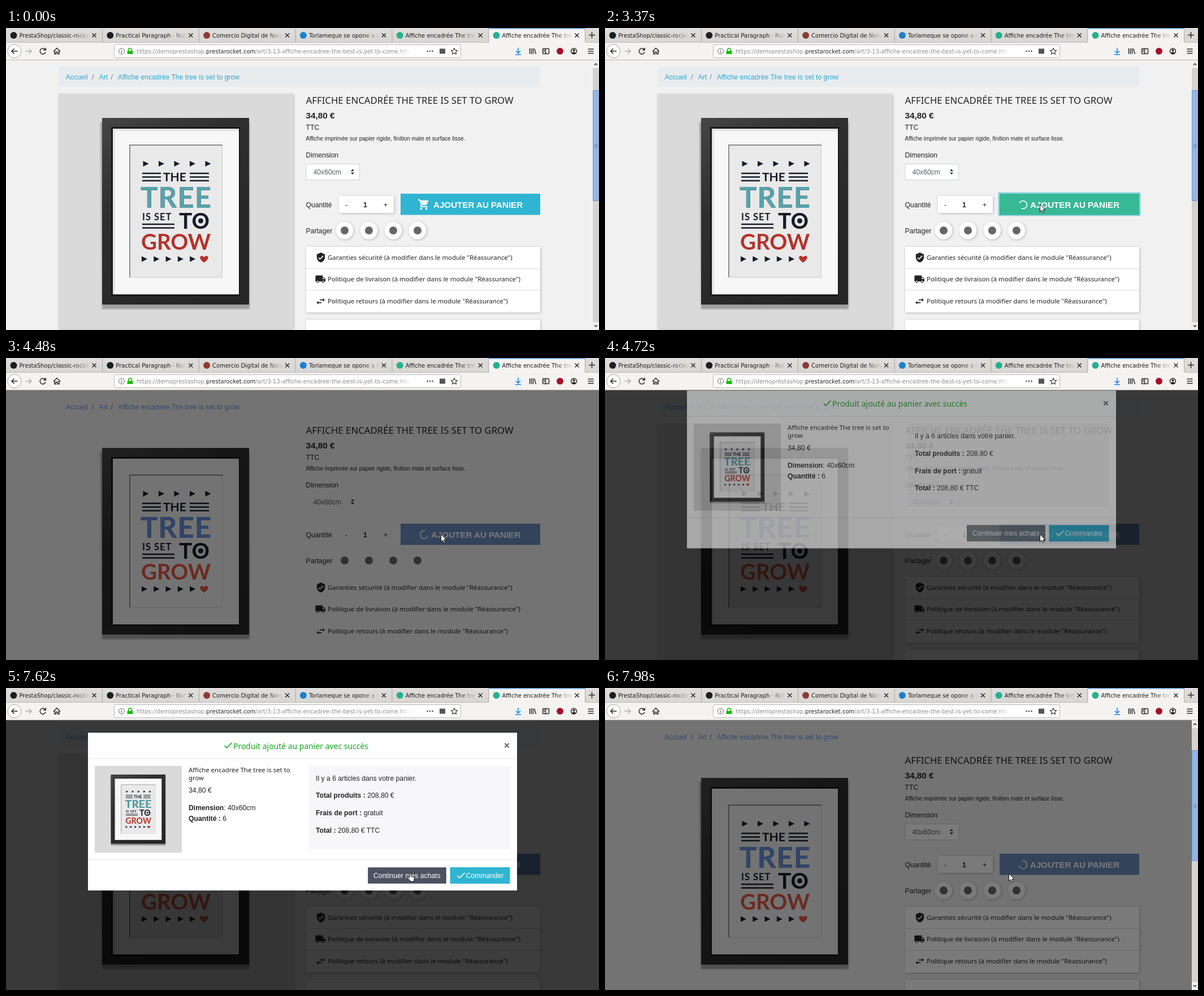
An HTML page that plays this animation: 1049 by 534 pixels, repeating every 8000 ms.

```html
<!DOCTYPE html>
<html lang="fr">
<head>
<meta charset="utf-8">
<title>Panier</title>
<style>
html, body { margin: 0; width: 100%; height: 100%; overflow: hidden; }
svg { display: block; width: 1049px; height: 534px; font: 12.2px "Liberation Sans", Arial, sans-serif; fill: #232323; }
text { white-space: pre; }
.noto { font-family: "Noto Sans", sans-serif; }
.ui { font: 10px "DejaVu Sans", sans-serif; }
.art { font-family: Lato, sans-serif; font-weight: 700; }
.b { font-weight: bold; }
.w { fill: #fff; }
.line { fill: none; stroke: #2b2b2b; stroke-width: 1.5; }
.card { fill: #fff; filter: drop-shadow(1px 1px 2px rgba(0,0,0,.25)); }
.rule { stroke: #dcdcdc; }
#page { --link: #2fa8d2; --teal: #58a2ab; --red: #b5322b; }
#page.dim { --link: #6598e6; --teal: #6890dc; --red: #dc5843; }
#page.plain { --wall: #f1f1f1; --mat: #f1f1f1; --edge: #f1f1f1; --paper: #f1f1f1; }
#page.plain .base { visibility: hidden; }
#page.flat .card, #page.flat .soft { fill: none; stroke: none; filter: none; }
.link { fill: var(--link); }
.teal { fill: var(--teal, #58a2ab); }
.red { fill: var(--red, #b5322b); }
.wall { fill: var(--wall, #dadada); }
.mat { fill: var(--mat, #f7f7f7); }
.edge { fill: var(--edge, #e4e4e4); }
.paper { fill: var(--paper, #e9e9e9); }
</style>
</head>
<body>
<svg viewBox="0 0 1049 534">
<defs>
  <linearGradient id="tabFade" gradientUnits="userSpaceOnUse" x1="118" x2="149">
    <stop stop-color="#1c1c1c"/><stop offset="1" stop-color="#1c1c1c" stop-opacity="0"/>
  </linearGradient>
  <linearGradient id="urlFade" gradientUnits="userSpaceOnUse" x1="692" x2="716">
    <stop stop-color="#8c8c8c"/><stop offset="1" stop-color="#8c8c8c" stop-opacity="0"/>
  </linearGradient>
  <linearGradient id="wood" x2=".6" y2="1">
    <stop stop-color="#454545"/><stop offset=".4" stop-color="#2f2f2f"/><stop offset="1" stop-color="#262626"/>
  </linearGradient>
  <linearGradient id="bar" x2="0" y2="1">
    <stop stop-color="#dfdddb"/><stop offset="1" stop-color="#d8d6d3"/>
  </linearGradient>
  <path id="check" d="M9 16.17 4.83 12l-1.42 1.41L9 19 21 7l-1.41-1.41z"/>
  <symbol id="poster" viewBox="93 117 415 415">
    <path class="wall" d="M93 117H508V532H93Z"/>
    <path d="M167 166H431V497H170Z" fill="#777" opacity=".6" style="filter:blur(1.5px)"/>
    <path d="M170 159H430V489H170Z" fill="url(#wood)"/>
    <path d="M186 175H414V474H186Z" fill="#191919"/>
    <path class="mat" d="M189 178H412V471H189Z"/>
    <path class="edge" d="M189 178H412V182H193V471H189Z"/>
    <path class="paper" d="M218 206H383V441H218Z"/>
    <path d="M219 441V207H383" fill="none" stroke="#8d8d8d" stroke-width="2"/>
    <path d="M382.500 208V441H219" fill="none" stroke="#c9c9c9"/>
    <g id="marks" fill="#171c28"></g>
    <g class="art" fill="#171c28">
      <path d="M241 257H274M241 263.500H274M241 270H274M325 257H359M325 263.500H359M325 270H359M241 347H298M241 353.500H298" stroke="#171c28" stroke-width="2.300"/>
      <text x="278" y="271" font-size="21">THE</text>
      <text x="238" y="317.500" font-size="51" letter-spacing="1">TREE</text>
      <text x="238" y="317.500" font-size="51" letter-spacing="1" class="teal">TREE</text>
      <text x="241" y="340" font-size="16.500" letter-spacing="1">IS SET</text>
      <text x="306" y="355" font-size="39">TO</text>
      <circle cx="344.500" cy="341" r="4.500"/>
      <text x="239" y="392" font-size="38.500" class="red">GROW</text>
      <path class="red" d="M350.500 415C340 407 343 403 346.500 403Q349.500 403 350.500 405.500 351.500 403 354.500 403C358 403 361 407 350.500 415Z"/>
    </g>
  </symbol>
</defs>

<g id="page">
  <path d="M0 56H1049V534H0Z" fill="#f1f1f1"/>
  <path class="base" d="M93 68H945V104H93Z" fill="#e8ecef"/>
  <g class="link">
    <text x="105.500" y="90.500">Accueil</text>
    <text x="164.500" y="90.500">Art</text>
    <text x="198" y="90.500">Affiche encadrée The tree is set to grow</text>
  </g>
  <text x="152" y="90.500" fill="#777">/</text><text x="185.500" y="90.500" fill="#777">/</text>
  <path class="card base" d="M93 117H508V532H93Z"/>
  <use href="#poster" x="93" y="117" width="415" height="415"/>

  <text class="noto" x="530.500" y="134" font-size="16.800">AFFICHE ENCADRÉE THE TREE IS SET TO GROW</text>
  <text class="b" x="530.500" y="160" font-size="15.300">34,80 €</text>
  <text x="530.500" y="179.500">TTC</text>
  <text x="530.500" y="198.500" font-size="10.050">Affiche imprimée sur papier rigide, finition mate et surface lisse.</text>
  <text x="530.500" y="229">Dimension</text>
  <path class="soft" d="M531 240.500H625.500V268.500H531Z" fill="#fff" stroke="#ccd0d4"/>
  <text x="543.500" y="258.500" fill="#55595c">40x60cm</text>
  <path d="M610 253 613 249.500 616 253ZM610 255.500 613 259 616 255.500Z"/>
  <text x="530.500" y="316.500">Quantité</text>
  <path class="card" d="M589 297H686V327H589Z"/>
  <text x="600" y="316.500">-</text><text class="b" x="632" y="316.500">1</text><text x="668" y="316.500">+</text>

  <path id="ring" d="M697 292H946V331H697Z" fill="none" stroke="#8fd0df" stroke-width="3"/>
  <path id="add" d="M698 293H945V330.500H698Z"/>
  <path id="cart" class="w" transform="translate(728 301)scale(.92)" d="M7 18c-1.100 0-1.990.9-1.990 2S5.900 22 7 22s2-.9 2-2-.9-2-2-2zM1 2v2h2l3.600 7.590-1.350 2.450c-.16.28-.25.61-.25.96 0 1.100.9 2 2 2h12v-2H7.420c-.14 0-.25-.11-.25-.25l.03-.12.9-1.630h7.450c.75 0 1.410-.41 1.750-1.030l3.580-6.490A1 1 0 0 0 20 4H5.210l-.94-2H1zm16 16c-1.100 0-1.990.9-1.990 2s.89 2 1.990 2 2-.9 2-2-.9-2-2-2z"/>
  <path id="spin" d="M5 5A7 7 0 1 1 5-5" fill="none" stroke="#fff" stroke-width="1.600"/>
  <text id="label" class="b w" y="317.500" font-size="15.150">AJOUTER AU PANIER</text>

  <text x="530.500" y="362.500">Partager</text>
  <g id="share"></g>

  <path class="card" d="M531 387H945V503H531Z"/>
  <path class="rule soft" d="M531 425.500H945M531 463.500H945"/>
  <path class="card" d="M531 516H945V540H531Z"/>
  <path transform="translate(547.400 396.200)scale(.8)" d="M12 1 3 5v6c0 5.550 3.840 10.740 9 12 5.160-1.260 9-6.450 9-12V5l-9-4zm-2 16-4-4 1.410-1.410L10 14.170l6.590-6.590L18 9l-8 8z"/>
  <path transform="translate(546.600 434.400)scale(.8)" d="M20 8h-3V4H3c-1.100 0-2 .9-2 2v11h2c0 1.660 1.340 3 3 3s3-1.340 3-3h6c0 1.660 1.340 3 3 3s3-1.340 3-3h2v-5l-3-4zM6 18.500a1.500 1.500 0 0 1 0-3 1.500 1.500 0 0 1 0 3zm13.500-9 1.960 2.500H17V9.500h2.500zm-1.500 9a1.500 1.500 0 0 1 0-3 1.500 1.500 0 0 1 0 3z"/>
  <path transform="translate(547 473.600)scale(.8)" d="M6.990 11 3 15l3.990 4v-3H14v-2H6.990v-3zM21 9l-3.990-4v3H10v2h7.010v3L21 9z"/>
  <g class="noto" font-size="11.400">
    <text x="569" y="409.700">Garanties sécurité (à modifier dans le module "Réassurance")</text>
    <text x="569" y="448">Politique de livraison (à modifier dans le module "Réassurance")</text>
    <text x="569" y="487">Politique retours (à modifier dans le module "Réassurance")</text>
  </g>
</g>

<path id="shade1" d="M0 56H1049V534H0Z" fill="#000"/>
<path id="shade2" d="M0 56H1049V534H0Z" fill="#000"/>

<g id="scroll">
  <path d="M1038 57H1049V534H1038Z" fill="#d6d2cf"/>
  <path d="M1038 57H1049V71H1038ZM1038 520H1049V534H1038Z" fill="#f0efee"/>
  <path d="M1038.500 110.500H1049V305.500H1038.500Z" fill="#94b6e4" stroke="#6f94c6"/>
  <path class="line" d="M1041 65.500 1043.500 63 1046 65.500M1041 525.500 1043.500 528 1046 525.500"/>
  <path d="M1041 206H1046M1041 208.500H1046M1041 211H1046" stroke="#5f82b3"/>
</g>

<g id="modal">
  <path d="M145 79H904V358H145Z" fill="#fff"/>
  <path class="rule" d="M145 125H904M145 303.800H904" stroke-width=".8"/>
  <g fill="#12a81c">
    <use href="#check" transform="translate(383.300 91.700)scale(.8)"/>
    <text class="noto" x="402" y="107.500" font-size="13.950">Produit ajouté au panier avec succès</text>
  </g>
  <path d="M882.300 97.800 889.700 105.200M889.700 97.800 882.300 105.200" stroke="#666" stroke-width="2"/>
  <use href="#poster" x="157" y="137.500" width="154" height="154"/>
  <text class="noto" x="323" y="149" font-size="11.300">Affiche encadrée The tree is set to</text>
  <text class="noto" x="323" y="162.800" font-size="11.300">grow</text>
  <text x="323" y="185">34,80 €</text>
  <text x="323" y="216"><tspan class="b">Dimension</tspan>: 40x60cm</text>
  <text x="323" y="234.500"><tspan class="b">Quantité :</tspan> <tspan id="qty"></tspan></text>
  <path d="M536 137.500H892V285H536Z" fill="#f7f7fa"/>
  <text x="548" y="164">Il y a <tspan id="count"></tspan> articles dans votre panier.</text>
  <text x="548" y="194.300"><tspan class="b">Total produits :</tspan> <tspan id="sum"></tspan></text>
  <text x="548" y="225.300"><tspan class="b">Frais de port :</tspan> gratuit</text>
  <text x="548" y="256"><tspan class="b">Total :</tspan> <tspan id="total"></tspan></text>
  <path id="more" d="M640.500 317.500H778.500V345.500H640.500Z" stroke="#6c747c"/>
  <path d="M785.500 317H891.500V346H785.500Z" fill="#2fb5d2"/>
  <g class="w">
    <text x="650" y="336">Continuer mes achats</text>
    <use href="#check" transform="translate(795.300 321.700)scale(.8)"/>
    <text x="813.500" y="336">Commander</text>
  </g>
</g>

<g class="ui">
  <path d="M0 0H1049V26H0Z" fill="url(#bar)"/>
  <path d="M0 25.500H1049V56.500H0Z" fill="#f4f3f2"/>
  <path d="M854 0H1025V27H854Z" fill="#f4f3f2"/>
  <path d="M854 0H1025V1.500H854Z" fill="#5b9be0"/>
  <path d="M0 25.500H854M1025 25.500H1049M0 56.500H1049" stroke="#bdbab7"/>
  <g id="tabs"></g>
  <path class="line" d="M1031 12.500H1042M1036.500 7V18"/>

  <circle cx="15" cy="41" r="12" fill="#fff" stroke="#a5a3a0"/>
  <path class="line" d="M20.500 41H10M14.500 36.500 10 41 14.500 45.500"/>
  <path class="line" style="stroke:#b4b2b0" d="M34.500 41H45M40.500 36.500 45 41 40.500 45.500"/>
  <path class="line" d="M69.500 38.500A5 5 0 1 0 70 42.500M70.300 35V39H66"/>
  <path class="line" d="M84 41.500 90 35.500 96 41.500M86 40.500V46H88.500V42.500H91.500V46H94V40.500"/>
  <rect x="191.500" y="29.500" width="613" height="23" rx="2" fill="#fff" stroke="#b9b7b4"/>
  <circle cx="204.500" cy="41" r="5" fill="none" stroke="#666"/>
  <path d="M204.500 40V44M204.500 37.800V39" stroke="#666" stroke-width="1.200"/>
  <path d="M214.500 40.500H224.500V46H214.500Z" fill="#12bc00"/>
  <path d="M216.700 41V38.500A2.800 2.800 0 0 1 222.300 38.500V41" fill="none" stroke="#12bc00" stroke-width="1.600"/>
  <text x="231" y="44.700" fill="url(#urlFade)">https://demoprestashop.<tspan fill="#222">prestarocket.com</tspan>/art/3-13-affiche-encadree-the-best-is-yet-to-come.html</text>
  <path d="M745.500 41H755.500" stroke="#444" stroke-width="2.600" stroke-dasharray="0 4.500" stroke-linecap="round"/>
  <rect x="767" y="36.500" width="10" height="9" fill="#555"/>
  <path class="line" stroke-linejoin="round" style="stroke-width:1.100" d="M793 35.500 794.700 39.200 798.700 39.600 795.700 42.300 796.600 46.300 793 44.200 789.400 46.300 790.300 42.300 787.300 39.600 791.300 39.200Z"/>
  <path class="line" style="stroke:#0a84ff" d="M906 35V44M902 40.500 906 44.500 910 40.500M901 47H911"/>
  <path class="line" d="M926.500 36V46M929.500 36V46M932.500 36V46M934.500 36.500 937.500 46"/>
  <rect class="line" x="949.500" y="36.500" width="11" height="9" rx="1"/>
  <path class="line" d="M954.500 36V46M951 39H953M951 41.500H953"/>
  <circle cx="980" cy="41" r="6" fill="#a80f26"/>
  <circle class="line" cx="1004.500" cy="41" r="5"/>
  <circle cx="1004.500" cy="39.500" r="2"/><path d="M1000.800 44.500Q1004.500 40 1008.200 44.500L1004.500 46.500Z"/>
  <path class="line" d="M1029.500 37.200H1039.500M1029.500 41H1039.500M1029.500 44.800H1039.500"/>
</g>

<g id="cursor" stroke="#111" fill="#fff" stroke-linejoin="round">
  <path id="arrow" d="M0 0V13.500L3 10.700 5 15.300 7.200 14.300 5.200 10H9.300Z"/>
  <path id="hand" d="M-1 1C-1-.8 1.700-.8 1.700 1V5L6 6Q8 6.500 8 8.500L7 12.500V14H0V12L-5 8Q-5.500 6-3.500 6.300L-1 8Z"/>
</g>
</svg>
<script>
const $ = id => document.getElementById(id);
const ramp = (t, a, b) => Math.min(1, Math.max(0, (t - a) / (b - a)));
const easeOut = p => 1 - (1 - p) ** 1.7;
const smooth = p => p * p * (3 - 2 * p);
const mix = (a, b, p) => a + (b - a) * p;
const show = (id, on) => $(id).style.display = on ? '' : 'none';

const tri = (x, y) => `<path d="M${x} ${y - 5}l10 5-10 5z"/>`;
$('marks').innerHTML = [0, 1, 2, 3, 4].map(i => tri(242.5 + i * 27.5, 240) + tri(240 + i * 21.3, 408.5)).join('');
$('share').innerHTML = [599, 642, 685, 728].map(x =>
  `<circle class="card" cx="${x}" cy="358" r="15.500"/><circle cx="${x}" cy="358" r="7" fill="#666"/>`).join('');

const tabs = [
  ['#1b1f23', 'PrestaShop/classic-rocket'], ['#1b1f23', 'Practical Paragraph · Notes'],
  ['#8c3b34', 'Comercio Digital de Norvalia'], ['#1d7fd0', 'Torlameque se opone a la carta'],
  ['#25b08f', 'Affiche encadrée The tree is'], ['#25b08f', 'Affiche encadrée The tree is']
];
$('tabs').innerHTML = tabs.map(([color, name], i) => `<g transform="translate(${i * 170.8})">
  <circle cx="13.500" cy="13" r="6" fill="${color}"/>
  <text x="23.500" y="16.500" fill="url(#tabFade)">${name}</text>
  <path class="line" d="M152.500 9.500l7 7m0-7l-7 7"/>
  <path d="M170.500 1V25" stroke="#aaa7a4"/></g>`).join('');

// Pointer stops: start, end, x, y
const moves = [[720, 720, 762, 315], [1160, 1280, 755, 312], [1530, 1740, 769.5, 311.5], [5640, 5980, 714.5, 328]];

function pointer(t) {
  let [, , x, y] = moves[0];
  for (const [a, b, nx, ny] of moves.slice(1)) {
    const p = smooth(ramp(t, a, b));
    x = mix(x, nx, p);
    y = mix(y, ny, p);
  }
  return [x, y];
}

function draw(t) {
  const loading = t >= 2290, second = t >= 4480, dim = t >= 3440;
  const flat = t >= 3530 && t < 4620;
  const style = $('page').classList;
  style.toggle('dim', dim);
  style.toggle('flat', flat);
  style.toggle('plain', flat || t >= 7800);

  const hover = ramp(t, 720, 940), from = [47, 181, 210], to = [54, 185, 148];
  $('add').style.fill = dim ? '#6c8cbd' : `rgb(${from.map((c, i) => mix(c, to[i], hover))})`;
  show('ring', loading && t < 3620);
  show('cart', !loading);
  show('spin', loading);
  $('spin').setAttribute('transform', `translate(739.500 312.500)rotate(${(t - 2290) / 750 * 360})`);
  $('label').setAttribute('x', loading ? 752 : 756);

  $('shade1').style.opacity = .52 * ramp(t, 3385, 3535);
  $('shade2').style.opacity = .5 * (ramp(t, 4480, 4630) - ramp(t, 7800, 7960));
  show('scroll', t < 3385 || t >= 7795);

  // Each dialog fades in 150 ms and slides in 300 ms
  const open = second ? 4635 : 3537;
  const slide = easeOut(ramp(t, open, open + 300)) - easeOut(ramp(t, 7640, 7940));
  $('modal').style.opacity = ramp(t, open, open + 150) - ramp(t, 7640, 7790);
  $('modal').setAttribute('transform', `translate(${second ? 0 : -5.5} ${-38.4 * (1 - slide)})`);
  const n = second ? 6 : 5, sum = (n * 34.8).toFixed(2).replace('.', ',') + ' €';
  $('qty').textContent = $('count').textContent = n;
  $('sum').textContent = sum;
  $('total').textContent = sum + ' TTC';

  const [x, y] = pointer(t), over = y > 317 && t > 5640 && t < 7790;
  $('more').style.fill = over ? t >= 7620 ? '#4c5261' : '#565e67' : '#6c757d';
  show('cursor', t >= 720);
  show('arrow', !over);
  show('hand', over);
  $('cursor').setAttribute('transform', `translate(${x} ${y})`);
}

function tick(now) {
  draw(now % 8000);
  requestAnimationFrame(tick);
}
draw(0);
requestAnimationFrame(tick);
</script>
</body>
</html>
```
